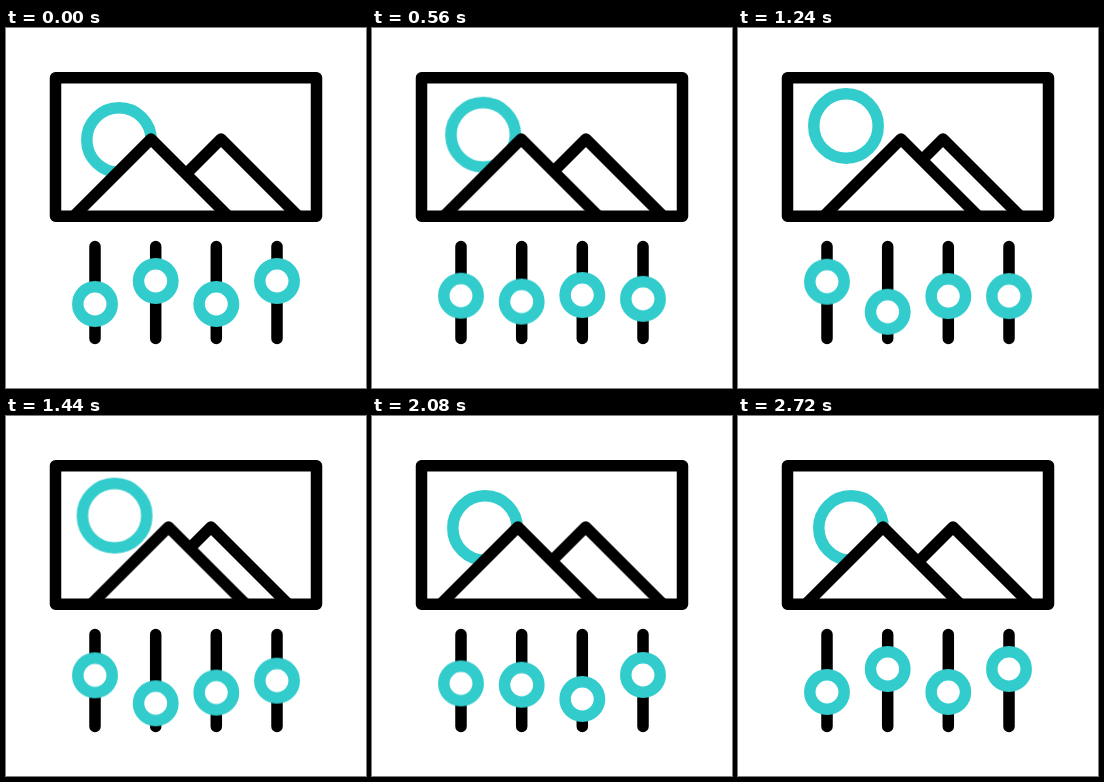
An HTML page for the animation above (2.8 s loop, 360x360 px).

```html
<!DOCTYPE html>
<html lang="en">
<head>
<meta charset="utf-8">
<title>Picture adjustments</title>
<style>
  html, body { margin: 0; width: 100%; height: 100%; overflow: hidden; background: #fff; }
  svg { display: block; width: 100vw; height: 100vh; }
  svg * { fill: none; stroke: #000; stroke-width: 11.5; stroke-linecap: round; stroke-linejoin: round; }
  circle { stroke: #3cc; }
  .front, .knobs circle { fill: #fff; }
  .feet { stroke-linecap: butt; }

  /* this curve is exactly smoothstep */
  .move { animation: 2800ms cubic-bezier(.3333, 0, .6667, 1) infinite; }
  .sun   { animation-name: sun; }
  .front { animation-name: front; }
  .back  { animation-name: back; }
  .k1 { animation-name: k1; }
  .k2 { animation-name: k2; }
  .k3 { animation-name: k3; }
  .k4 { animation-name: k4; }

  @keyframes sun {
    0%, 7.4%, 75.2%, 100% { transform: none; }
    37.8%, 45% { transform: translate(-5px, -14px); }
  }
  @keyframes front {
    0%, 10.6%, 78.3%, 100% { transform: none; }
    41%, 48.3% { transform: translateX(18px); }
  }
  @keyframes back {
    0%, 13.9%, 81%, 100% { transform: none; }
    43.8%, 51.6% { transform: translateX(-10px); }
  }

  @keyframes k1 {
    0%, 8.6%, 95.7%, 100% { transform: translateY(276px); }
    37.9% { transform: translateY(251.5px); }
    64.5%, 70% { transform: translateY(266.7px); }
  }
  @keyframes k2 {
    0%, 4.3%, 90%, 100% { transform: translateY(253px); }
    22.9%, 25.7% { transform: translateY(275px); }
    55.7%, 56.4% { transform: translateY(288px); }
  }
  @keyframes k3 {
    0%, 4.3%, 92.9%, 100% { transform: translateY(276px); }
    29.3%, 35.9% { transform: translateY(263px); }
    63.6% { transform: translateY(286px); }
  }
  @keyframes k4 {
    0%, 4.3%, 92.9%, 100% { transform: translateY(253px); }
    25.1%, 26.2% { transform: translateY(274px); }
    63.9% { transform: translateY(261.5px); }
  }
</style>
</head>
<body>
<svg viewBox="0 0 360 360">
  <circle class="move sun" cx="113" cy="112" r="32.2"/>
  <path class="move back feet" d="M180 146L215 111L292 188"/>
  <path class="move front feet" d="M68 188L145 111L222 188"/>
  <rect x="49.5" y="49.7" width="261" height="138.6"/>

  <path d="M89 218.5V310.5M149.7 218.5V310.5M210.3 218.5V310.5M271 218.5V310.5"/>
  <g class="knobs">
    <circle class="move k1" cx="89" r="17.2"/>
    <circle class="move k2" cx="149.7" r="17.2"/>
    <circle class="move k3" cx="210.3" r="17.2"/>
    <circle class="move k4" cx="271" r="17.2"/>
  </g>
</svg>
</body>
</html>
```
